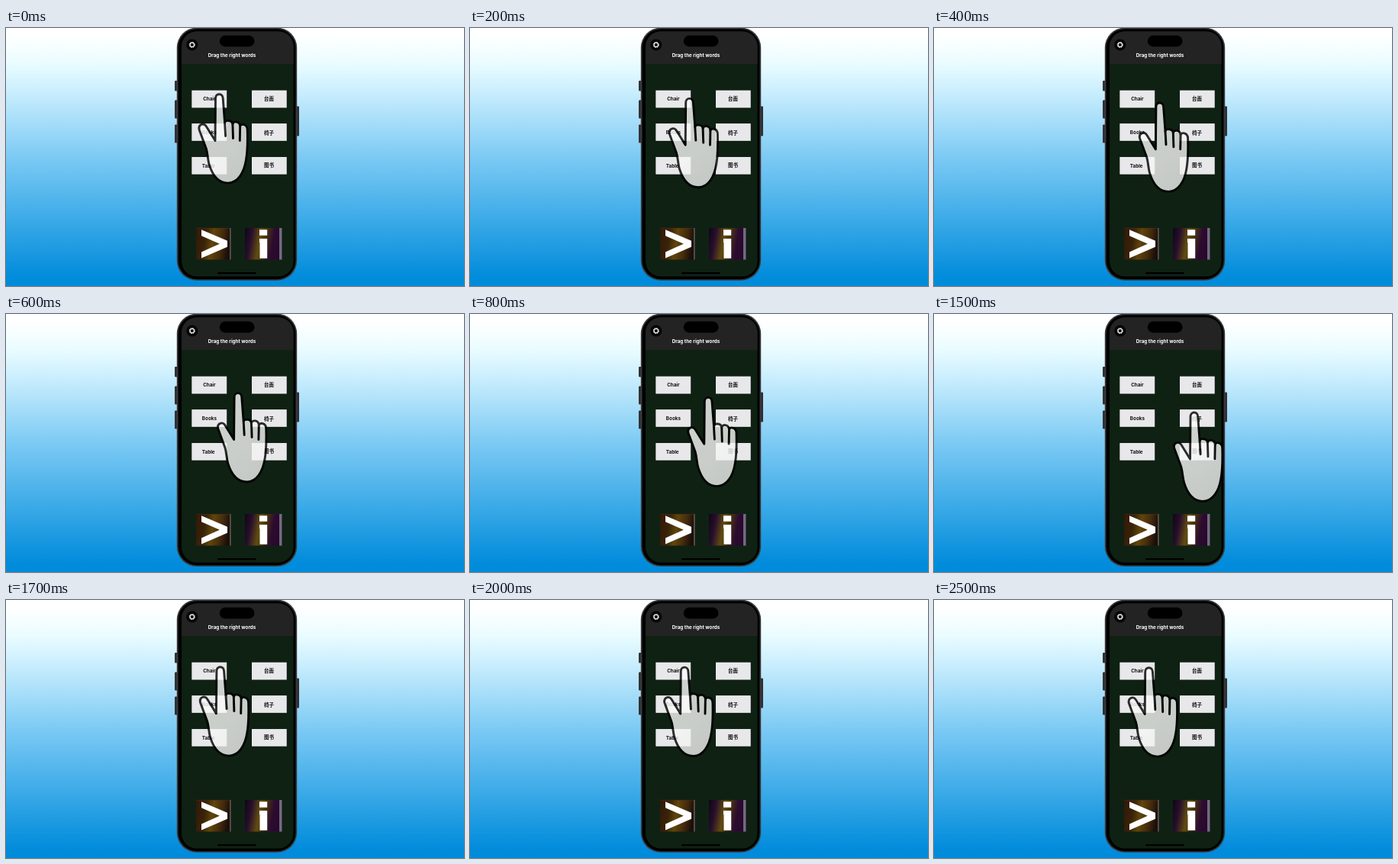
Animation of 600x338 px, one loop 2.6 s. Source, as an HTML page:

```html
<!DOCTYPE html>
<html lang="en">
<head>
<meta charset="utf-8">
<title>Drag the right words</title>
<style>
html, body { margin: 0; width: 100%; height: 100%; overflow: hidden; }
svg { display: block; width: 100vw; height: 100vh; }
text { font-family: Inter, "Noto Sans CJK SC", "Noto Sans CJK", sans-serif; font-weight: 700; text-anchor: middle; }
</style>
</head>
<body>
<svg viewBox="0 0 600 338" preserveAspectRatio="none">
  <defs>
    <linearGradient id="sky" x2="0" y2="1">
      <stop stop-color="#fff"/><stop offset=".04" stop-color="#fdffff"/><stop offset=".14" stop-color="#e9fcff"/>
      <stop offset=".26" stop-color="#c6ecfd"/><stop offset=".5" stop-color="#7ccaf4"/>
      <stop offset=".75" stop-color="#3aa9e7"/><stop offset=".97" stop-color="#008bdb"/>
    </linearGradient>
    <linearGradient id="skin" x2=".5" y2="1">
      <stop stop-color="#fff"/><stop offset="1" stop-color="#f0f2f0"/>
    </linearGradient>
    <linearGradient id="next" x2="1" y2=".15">
      <stop stop-color="#34170a"/><stop offset=".3" stop-color="#382408"/><stop offset=".52" stop-color="#61450b"/>
      <stop offset=".78" stop-color="#452b0c"/><stop offset="1" stop-color="#1b0f0a"/>
    </linearGradient>
    <linearGradient id="info" x2="1" y2=".15">
      <stop stop-color="#0f0616"/><stop offset=".2" stop-color="#280e2c"/><stop offset=".44" stop-color="#614c10"/>
      <stop offset=".6" stop-color="#483310"/><stop offset=".8" stop-color="#2d0b31"/><stop offset="1" stop-color="#260a2b"/>
    </linearGradient>
    <clipPath id="screen"><rect x="230" y="4.5" width="146.5" height="321" rx="20"/></clipPath>
  </defs>

  <rect width="600" height="338" fill="url(#sky)"/>

  <g fill="#303234">
    <rect x="221" y="69" width="5" height="13.5" rx="1"/>
    <rect x="221" y="94.5" width="5" height="24" rx="1"/>
    <rect x="221" y="126.5" width="5" height="24" rx="1"/>
    <rect x="379" y="102.5" width="5" height="39" rx="1"/>
  </g>
  <rect x="223.8" y="-.4" width="157.4" height="331.2" rx="26" fill="#38393c"/>
  <rect x="225.5" y="1.2" width="154" height="328" rx="24.5" fill="#000"/>

  <g clip-path="url(#screen)">
    <rect x="230" y="4" width="147" height="322" fill="#0f2113"/>
    <rect x="230" y="4" width="147" height="43" fill="#232323"/>
  </g>
  <rect x="279.8" y="9.8" width="45.7" height="14.7" rx="7.35" fill="#000"/>
  <rect x="277" y="320" width="51" height="2.2" rx="1.1" fill="#000"/>

  <circle cx="243.8" cy="22" r="7.6" fill="#050505"/>
  <g stroke="#e4e4e4" fill="none">
    <circle cx="243.8" cy="22" r="2.7" stroke-width="1.3"/>
    <circle cx="243.8" cy="22" r="3.6" stroke-width="1" stroke-dasharray="1.63 1.197"/>
  </g>
  <text x="296" y="38.3" font-size="6.3" fill="#fff">Drag the right words</text>

  <g id="cards"></g>

  <rect x="249" y="262" width="45.5" height="41.5" fill="url(#next)"/>
  <path d="M249 262.3H294" stroke="#54291b" stroke-width=".6"/>
  <rect x="293.2" y="262" width="1.4" height="41.5" fill="#6d6063"/>
  <path d="M256 264.2L290 278.8V286.8L256 301.4V293.4L279.8 282.8L256 272.3Z" fill="#fff"/>

  <rect x="313" y="262" width="48.5" height="41.5" fill="url(#info)"/>
  <rect x="358" y="262" width="3.5" height="41.5" fill="#776881"/>
  <path d="M332 264.3H342.2V271.8H332ZM332 276H342.2V301.7H332.5V281H332Z" fill="#fff"/>

  <g id="hand" opacity=".81" stroke="#000" stroke-width="2.9" stroke-linecap="round" stroke-linejoin="round">
    <path fill="url(#skin)" d="M-4.8 7.6C-4.8 .3 4.7 .3 4.9 7.6L7.3 39.3
      C8 35.6 17 35.8 17.6 41.3C18.6 36.6 26.8 37.5 27.4 43.8
      C29.5 40.1 36.6 41.6 36.9 48.3C37.3 62 37.3 76 35.2 88
      C32.6 105 24.5 118.3 11.5 118.5C-2.5 118.5 -9.5 106 -13.2 94
      C-15.2 87 -15 80 -17 73.4L-25.9 49.3C-28.3 42.3 -20.4 38.4 -16.9 44.3L-5.3 63Z"/>
    <path fill="none" d="M7.3 39.3L8.3 57M17.6 41.3L18.2 60M27.4 43.8L27 63"/>
  </g>
</svg>
<script>
const NS = "http://www.w3.org/2000/svg";
const LOOP = 2600, STEP = 100, RETURN = 1600;
const cards = document.getElementById("cards");
const hand = document.getElementById("hand");

function add(tag, attrs, text = "") {
  const el = document.createElementNS(NS, tag);
  for (const key in attrs) el.setAttribute(key, attrs[key]);
  el.textContent = text;
  cards.append(el);
}

function card(x, y, label, textX, textY, size) {
  add("rect", { x, y, width: 45.8, height: 22.8, fill: "#a9adab" });
  add("rect", { x, y, width: 45.4, height: 22.3, fill: "#e8e8ea" });
  add("text", { x: textX, y: textY, "font-size": size, fill: "#111" }, label);
}

card(243.5, 81.8, "Chair", 266.4, 95, 6.3);
card(243.5, 125.2, "Books", 266.4, 138.6, 6.3);
card(243.5, 169, "Table", 265.2, 183.2, 6.3);
card(322, 81.8, "台面", 344.6, 95.4, 6.5);
card(322, 125.2, "椅子", 344.6, 140, 6.5);
card(322, 169, "图书", 344.6, 182.4, 6.5);

// Steady drag to the match, a cut back, then a slow drift.
function fingertip(t) {
  if (t < RETURN) return [279.3 + t * 0.041, 84.6 + t * 0.0282];
  const s = (t - RETURN) / (LOOP - RETURN);
  return [280.6 + s, 85.5 + s * 1.2];
}

function draw(now) {
  const t = Math.floor(now % LOOP / STEP) * STEP;
  hand.setAttribute("transform", `translate(${fingertip(t)})`);
  requestAnimationFrame(draw);
}
draw(performance.now());
</script>
</body>
</html>
```
